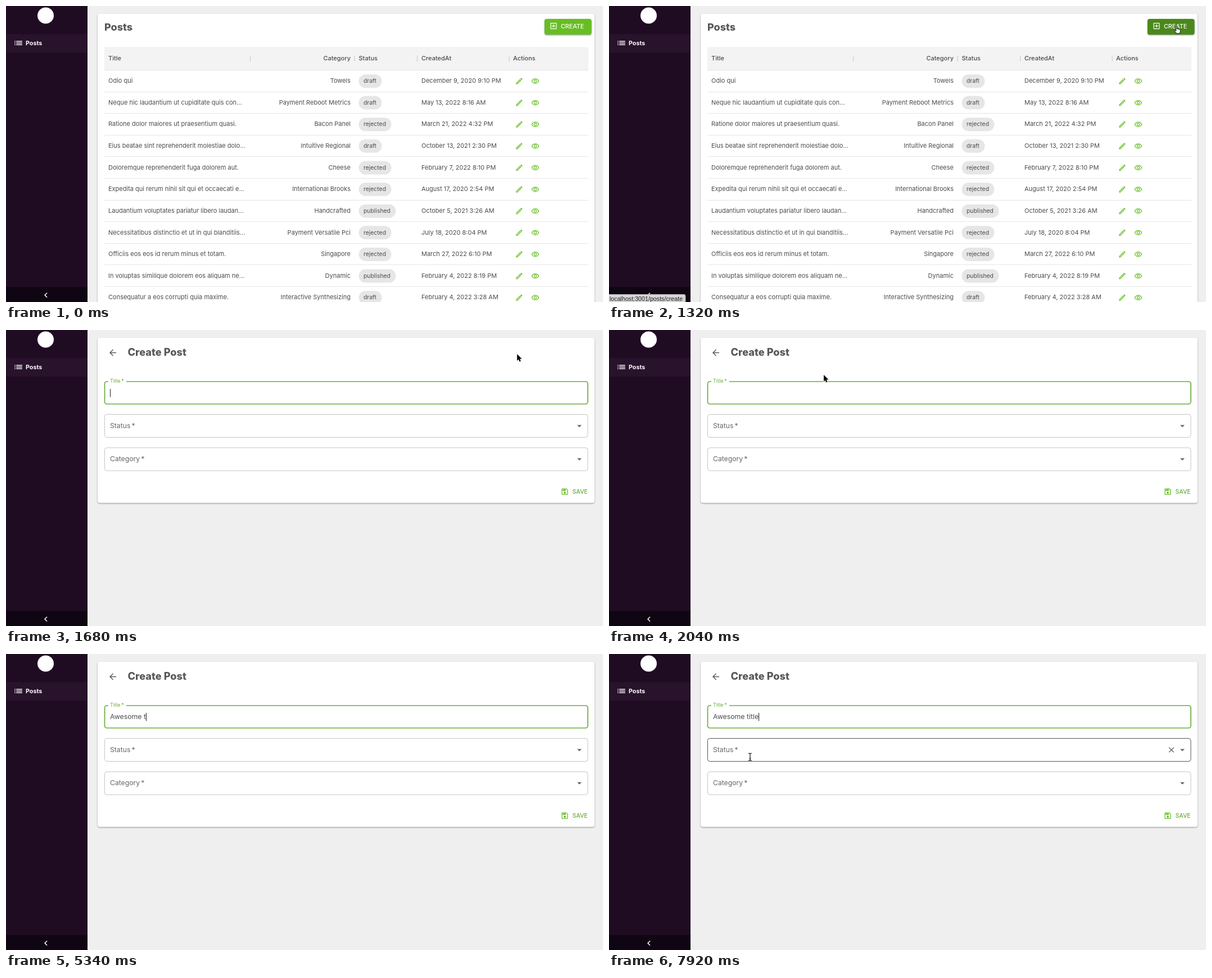
Write an HTML page that moves like this. It is 1062 px wide and 528 px high and loops after 8 s.

```html
<!DOCTYPE html>
<html>
<head>
<meta charset="utf-8">
<style>
html, body { margin: 0; width: 100%; height: 100%; overflow: hidden; background: #efefef; }
svg { display: block; width: 1062px; height: 528px; font-family: Inter, "Open Sans", sans-serif; }
text { white-space: pre; }
.card { fill: #fff; filter: drop-shadow(0 1px 1.2px #0006); }
</style>
</head>
<body>
<svg id="stage" viewBox="0 0 1062 528"></svg>
<script>
const ICON = {
  list: 'M3 13h2v-2H3v2zm0 4h2v-2H3v2zm0-8h2V7H3v2zm4 4h14v-2H7v2zm0 4h14v-2H7v2zM7 7v2h14V7H7z',
  edit: 'M14.06 9.02l.92.92L5.92 19H5v-.92l9.06-9.06M17.66 3c-.25 0-.51.1-.7.29l-1.83 1.83 3.75 3.75 1.83-1.83c.39-.39.39-1.02 0-1.41l-2.34-2.34c-.2-.2-.45-.29-.71-.29zm-3.6 3.19L3 17.25V21h3.75L17.81 9.94l-3.75-3.75z',
  eye: 'M12 6c3.79 0 7.17 2.13 8.82 5.5C19.17 14.87 15.79 17 12 17s-7.17-2.13-8.82-5.5C4.83 8.13 8.21 6 12 6m0-2C7 4 2.73 7.11 1 11.5 2.73 15.89 7 19 12 19s9.27-3.11 11-7.5C21.27 7.11 17 4 12 4zm0 5c1.38 0 2.5 1.12 2.5 2.5S13.38 14 12 14s-2.5-1.12-2.5-2.5S10.62 9 12 9m0-2c-2.48 0-4.5 2.02-4.5 4.5S9.52 16 12 16s4.5-2.02 4.5-4.5S14.48 7 12 7z',
  add: 'M19 3H5c-1.11 0-2 .9-2 2v14c0 1.1.89 2 2 2h14c1.1 0 2-.9 2-2V5c0-1.1-.89-2-2-2zm0 16H5V5h14v14zm-8-2h2v-4h4v-2h-4V7h-2v4H7v2h4z',
  save: 'M17 3H5c-1.11 0-2 .9-2 2v14c0 1.1.89 2 2 2h14c1.1 0 2-.9 2-2V7l-4-4zm2 16H5V5h11.17L19 7.83V19zm-7-7c-1.66 0-3 1.34-3 3s1.34 3 3 3 3-1.34 3-3-1.34-3-3-3zM6 6h9v4H6z',
  back: 'M20 11H7.83l5.59-5.59L12 4l-8 8 8 8 1.41-1.41L7.83 13H20v-2z',
  left: 'M15.41 7.41 14 6l-6 6 6 6 1.41-1.41L10.83 12z',
  close: 'M19 6.41 17.59 5 12 10.59 6.41 5 5 6.41 10.59 12 5 17.59 6.41 19 12 13.41 17.59 19 19 17.59 13.41 12z',
  down: 'M7 10l5 5 5-5z'
};

const icon = (name, x, y, scale, fill) =>
  `<path d="${ICON[name]}" fill="${fill}" fill-rule="evenodd" transform="translate(${x} ${y}) scale(${scale}) translate(-12 -12)"/>`;
const rect = (x, y, w, h, fill, more = '') =>
  `<rect x="${x}" y="${y}" width="${w}" height="${h}" fill="${fill}" ${more}/>`;
const text = (str, x, y, size, fill, weight = 400, more = '') =>
  `<text x="${x}" y="${y}" font-size="${size}" fill="${fill}" font-weight="${weight}" ${more}>${str}</text>`;
const field = (y, h, id, stroke = '#c4c4c4', width = 1) =>
  rect(175.5, y, 859.5, h, '#fff', `id="${id}" rx="4" stroke="${stroke}" stroke-width="${width}"`);

const END = 'text-anchor="end"', GREEN = '#67be23', FOCUS = '#68ad3a';
const INK = '#4c4c4c', HEAD = '#585858', LABEL = '#666';
const CHIP = { draft: 41, rejected: 58, published: 66 };
const ROWS = [
  ['Odio qui', 'Towels', 'draft', 'December 9, 2020 9:10 PM'],
  ['Neque hic laudantium ut cupiditate quis con...', 'Payment Reboot Metrics', 'draft', 'May 13, 2022 8:16 AM'],
  ['Ratione dolor maiores ut praesentium quasi.', 'Bacon Panel', 'rejected', 'March 21, 2022 4:32 PM'],
  ['Eius beatae sint reprehenderit molestiae dolo...', 'Intuitive Regional', 'draft', 'October 13, 2021 2:30 PM'],
  ['Doloremque reprehenderit fuga dolorem aut.', 'Cheese', 'rejected', 'February 7, 2022 8:10 PM'],
  ['Expedita qui rerum nihil sit qui et occaecati e...', 'International Brooks', 'rejected', 'August 17, 2020 2:54 PM'],
  ['Laudantium voluptates pariatur libero laudan...', 'Handcrafted', 'published', 'October 5, 2021 3:26 AM'],
  ['Necessitatibus distinctio et ut in qui blanditiis...', 'Payment Versatile Pci', 'rejected', 'July 18, 2020 8:04 PM'],
  ['Officiis eos eos id rerum minus et totam.', 'Singapore', 'rejected', 'March 27, 2022 6:10 PM'],
  ['In voluptas similique dolorem eos aliquam ne...', 'Dynamic', 'published', 'February 4, 2022 8:19 PM'],
  ['Consequatur a eos corrupti quia maxime.', 'Interactive Synthesizing', 'draft', 'February 4, 2022 3:28 AM']
];

function tableRow([title, category, status, date], i) {
  const mid = 133.5 + 38.62 * i, base = mid + 3.7;
  return text(title, 182, base, 11, INK) + text(category, 613, base, 11, INK, 400, END) +
    rect(627.5, mid - 11.5, CHIP[status], 24, '#e6e6e6', 'rx="12"') +
    text(status, 636, base, 10.4, INK) + text(date, 739, base, 11, INK) +
    icon('edit', 913, mid + .5, .62, GREEN) + icon('eye', 941.5, mid + .8, .62, GREEN) +
    rect(175, Math.round(mid + 19), 861, 1, '#e6e6e6');
}

const sidebar = rect(0, 0, 145, 528, '#1f0c22') + rect(0, 50, 145, 33, '#29122c') +
  '<circle cx="70.5" cy="17" r="14.5" fill="#fff"/>' +
  icon('list', 22, 66, .76, '#fff') + text('Posts', 35, 69.5, 10.7, '#fff', 700) +
  rect(0, 501, 145, 27, '#100512') + icon('left', 71, 515.7, .75, '#fff');

const listPage = '<g id="list">' + rect(163, 14, 884, 540, '#fff', 'rx="4" class="card"') +
  text('Posts', 175, 43.7, 18, HEAD, 800) +
  rect(958, 23, 83.5, 28, GREEN, 'id="create" rx="4" style="filter:drop-shadow(0 1px 1.2px #0007)"') +
  icon('add', 974, 35.7, .62, '#fff') + text('CREATE', 987, 39.7, 10.7, '#fff', 500) +
  rect(175, 73, 861, 41.5, '#f3f3f3', 'rx="3"') + rect(175, 114, 861, 1, '#e6e6e6') +
  text('Title', 182, 97.4, 11, INK, 500) + text('Category', 613, 97.4, 11, INK, 500, END) +
  text('Status', 627.5, 97.4, 11, INK, 500) + text('CreatedAt', 739, 97.4, 11, INK, 500) +
  text('Actions', 902, 97.4, 11, INK, 500) +
  [434, 619.5, 731, 894.5].map(x => rect(x, 88.5, 1.2, 10.5, '#cfcfcf')).join('') +
  ROWS.map(tableRow).join('') + '</g>';

const formPage = '<g id="form">' + rect(163, 14, 884, 294.5, '#fff', 'rx="4" class="card"') +
  icon('back', 190, 40.5, .75, '#5c5c5c') + text('Create Post', 216.5, 46.3, 18.2, HEAD, 800) +
  field(92, 40, 'titleBox', FOCUS, 1.7) + rect(182, 90, 32, 4, '#fff', 'id="notch"') +
  text('Title\u2009*', 185, 115.5, 12.2, LABEL, 400, 'id="label"') +
  text('', 185, 116.3, 12.3, INK, 400, 'id="typed"') + rect(185, 105, 1, 14.5, '#222', 'id="caret"') +
  field(150.5, 41, 'statusBox') + text('Status\u2009*', 185, 175, 12.2, LABEL) +
  field(210, 41, 'categoryBox') + text('Category\u2009*', 185, 234.4, 12.2, LABEL) +
  icon('down', 1020, 171, .8, '#666') + icon('down', 1020, 230.3, .8, '#666') +
  `<g id="clear">${icon('close', 1000.5, 171, .68, '#666')}</g>` +
  icon('save', 994, 288.3, .62, GREEN) + text('SAVE', 1007.5, 292, 10.5, FOCUS, 500) + '</g>';

const linkBar = '<g id="link">' +
  '<path d="M-1 514.5H133q3 0 3 3V529H-1Z" fill="#d6d6d6" stroke="#a8a8a8"/>' +
  text('localhost:3001/posts/create', 1, 525.5, 10.7, '#222', 400, 'font-family="Liberation Sans, sans-serif"') + '</g>';

const pointer = '<g id="pointer">' +
  '<path id="arrow" d="M0 0V11.8L2.7 9.4 4.5 13.5 6.6 12.6 4.8 8.6H8.5Z" stroke="#fff" stroke-width="1.6" paint-order="stroke"/>' +
  '<path id="hand" d="M.2 1.4C.2 0 2 0 2 1.4V5C2.4 4.4 3.9 4.5 4 5.4 4.6 4.8 5.8 5 5.9 5.9 6.6 5.4 7.7 5.8 7.7 6.9V9.5C7.7 11 6.9 11.8 6.7 13H1C.8 11.8-1.9 9.2-2.4 8.2-2.7 7.4-1.6 6.8-1 7.4L.2 8.6Z" fill="#fff" stroke="#000" stroke-width=".9"/>' +
  '<path id="beam" d="M-3-6.5Q0-6.5 0-5Q0-6.5 3-6.5M0-5.5V5.5M-3 6.5Q0 6.5 0 5Q0 6.5 3 6.5M-1.5 2.5h3" fill="none" stroke="#111" stroke-width="1.2"/></g>';

document.getElementById('stage').innerHTML = sidebar + listPage + formPage + linkBar + pointer;
const $ = id => document.getElementById(id);
const show = (id, on) => $(id).style.display = on ? '' : 'none';
const set = (id, attrs) => Object.entries(attrs).forEach(([k, v]) => $(id).setAttribute(k, v));
const ramp = (t, from, len) => Math.min(1, Math.max(0, (t - from) / len));
const smooth = u => u * u * (3 - 2 * u);
const mix = (a, b, u) => a + (b - a) * u;
const blend = (a, b, u) => `rgb(${a.map((v, i) => mix(v, b[i], u))})`;

const LOOP = 8000, OPEN = 1350, FIRST_KEY = 2760, KEY = 290, BLINK = 600, PHRASE = 'Awesome title';
const PATH = [ // time, x, y
  [60, 945, 338], [700, 1008.5, 36], [1560, 1008.5, 36], [2040, 382, 80],
  [2400, 359, 109], [6850, 359, 109], [7620, 251, 183.5], [LOOP, 251, 183.5]
];

function pointerAt(t) {
  const i = Math.max(1, PATH.findIndex(p => p[0] > t));
  const [t0, x0, y0] = PATH[i - 1], [t1, x1, y1] = PATH[i];
  const u = smooth(ramp(t, t0, t1 - t0));
  return [mix(x0, x1, u), mix(y0, y1, u)];
}

function draw(t) {
  const onForm = t >= OPEN, [x, y] = pointerAt(t);
  show('list', !onForm);
  show('form', onForm);

  const hand = !onForm && x > 958 && y > 23 && y < 51;
  const overStatus = onForm && y > 150 && y < 192;
  const beam = overStatus || onForm && y > 91 && y < 133;
  show('pointer', t >= 60 && (t < FIRST_KEY || t >= 6720));
  set('pointer', { transform: `translate(${x} ${y})` });
  show('hand', hand);
  show('beam', beam);
  show('arrow', !hand && !beam);
  set('create', { fill: blend([103, 190, 35], [74, 136, 27], ramp(t, 520, 250)) });
  $('link').style.opacity = ramp(t, 900, 120) * (1 - ramp(t, 1500, 180));

  const lift = smooth(ramp(t, 1390, 200));
  set('label', { y: mix(115.5, 94.2, lift), 'font-size': mix(12.2, 9.1, lift),
    fill: blend([102, 102, 102], [104, 173, 58], lift) });
  set('notch', { width: 32 * lift });

  const keys = Math.min(PHRASE.length, Math.max(0, Math.floor((t - FIRST_KEY) / KEY) + 1));
  const since = t - (keys ? FIRST_KEY + (keys - 1) * KEY : OPEN - 30);
  $('typed').textContent = PHRASE.slice(0, keys);
  set('caret', { x: 185 + (keys && onForm ? $('typed').getComputedTextLength() : 0) });
  show('caret', since % (2 * BLINK) < BLINK);

  set('statusBox', { stroke: overStatus ? '#555' : '#c4c4c4' });
  show('clear', overStatus);
}

function tick(now) {
  draw(now % LOOP);
  requestAnimationFrame(tick);
}
draw(0);
requestAnimationFrame(tick);
</script>
</body>
</html>
```
